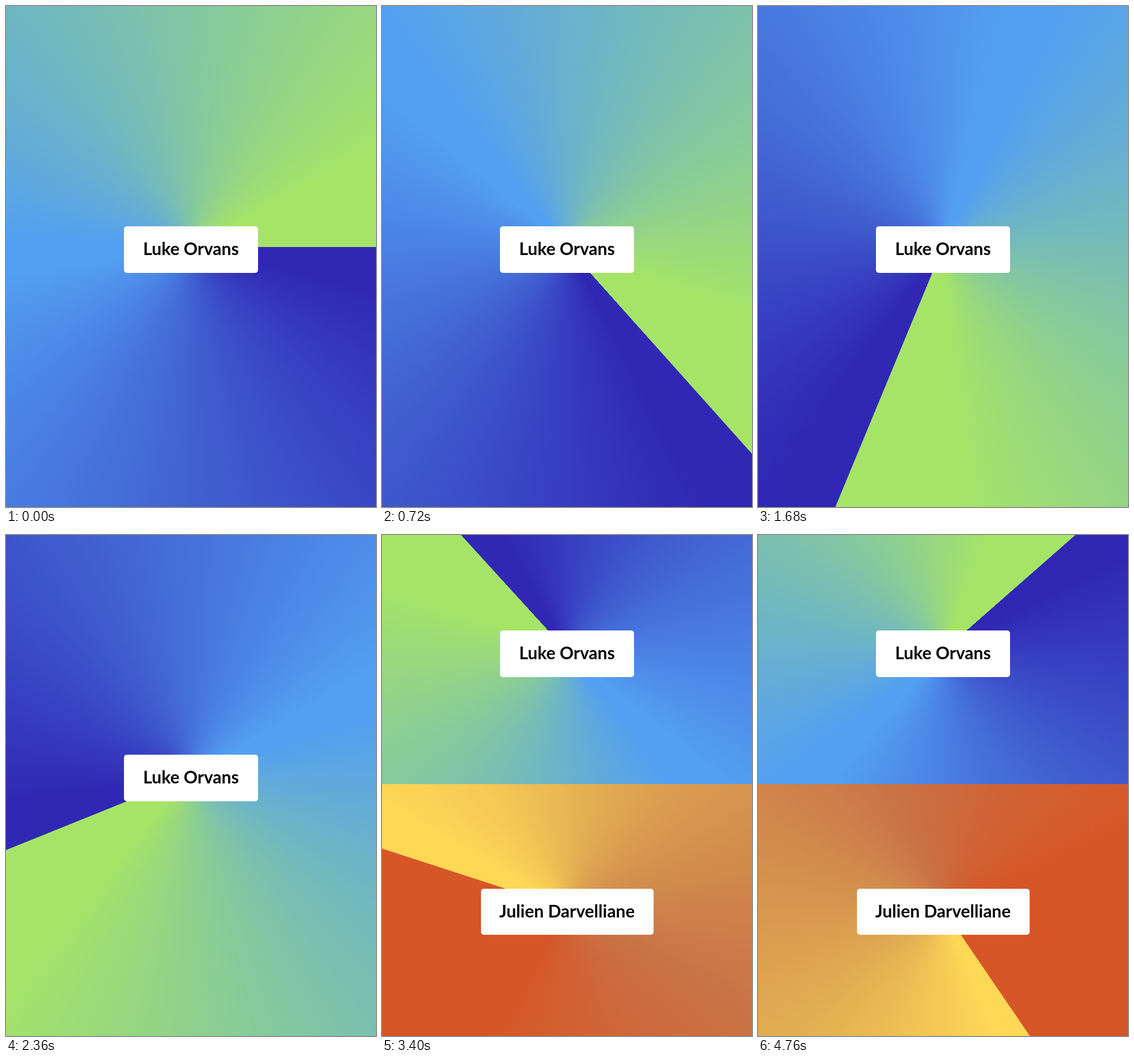
Animation of 643 by 871 pixels, one loop 4.8 s. Source, as an HTML page without scripts:

```html
<!DOCTYPE html>
<html lang="en">
<head>
<meta charset="utf-8">
<title>Rooms</title>
<style>
  @property --spin {
    syntax: "<angle>";
    inherits: false;
    initial-value: 0deg;
  }

  html, body {
    margin: 0;
    width: 100%;
    height: 100%;
    overflow: hidden;
  }

  .stage {
    position: relative;
    width: 643px;
    height: 871px;
    overflow: hidden;
  }

  /* The last sliver of each gradient blends back to its start, to smooth the edge. */
  .room {
    position: absolute;
    left: 0;
    width: 100%;
    background: conic-gradient(from var(--spin) at 321.5px var(--center),
      var(--colors) 359.85deg, var(--start) 360deg);
  }

  .cool {
    --center: 419px;
    --label-top: 383px;
    --start: #3028b4;
    --colors: var(--start) 14deg, #539ff2 172deg 182deg, #a6e467 334deg;
    top: 0;
    height: 1100px;
    animation: cool-spin 4.8s linear infinite, move-up 4.8s linear infinite;
  }

  .warm {
    --center: 216.5px;
    --label-top: 181.5px;
    --start: #fdd756;
    --colors: var(--start) 12deg, #e3ae52 85deg, #d4914e 135deg, #c97346 190deg, #d65627 285deg;
    top: 433px;
    height: 438px;
    animation: warm-spin 4.8s linear infinite, enter 4.8s linear infinite;
  }

  .name {
    position: absolute;
    top: var(--label-top);
    left: calc(321.5px - var(--width) / 2);
    width: var(--width);
    height: 80.5px;
    box-sizing: border-box;
    border-radius: 5px;
    background: #fff;
    color: #060608;
    font: 700 30px/77px Lato, sans-serif;
    text-align: center;
    white-space: nowrap;
  }

  @keyframes cool-spin {
    from { --spin: 90deg; }
    to { --spin: 411.4deg; }
  }

  @keyframes warm-spin {
    0% { --spin: -256deg; }
    70.833% { --spin: 287.9deg; }
    85% { --spin: 397.5deg; }
    100% { --spin: 512deg; }
  }

  @keyframes move-up {
    0% { transform: none; }
    48.333% { transform: translateY(0); animation-timing-function: ease-in-out; }
    65%, 100% { transform: translateY(-217px); }
  }

  @keyframes enter {
    0% { transform: translateY(440px); }
    48.333% { transform: translateY(440px); animation-timing-function: ease-in-out; }
    65%, 100% { transform: translateY(0); }
  }
</style>
</head>
<body>
<div class="stage">
  <div class="room cool"><div class="name" style="--width: 233px">Luke Orvans</div></div>
  <div class="room warm"><div class="name" style="--width: 300px">Julien Darvelliane</div></div>
</div>
</body>
</html>
```
